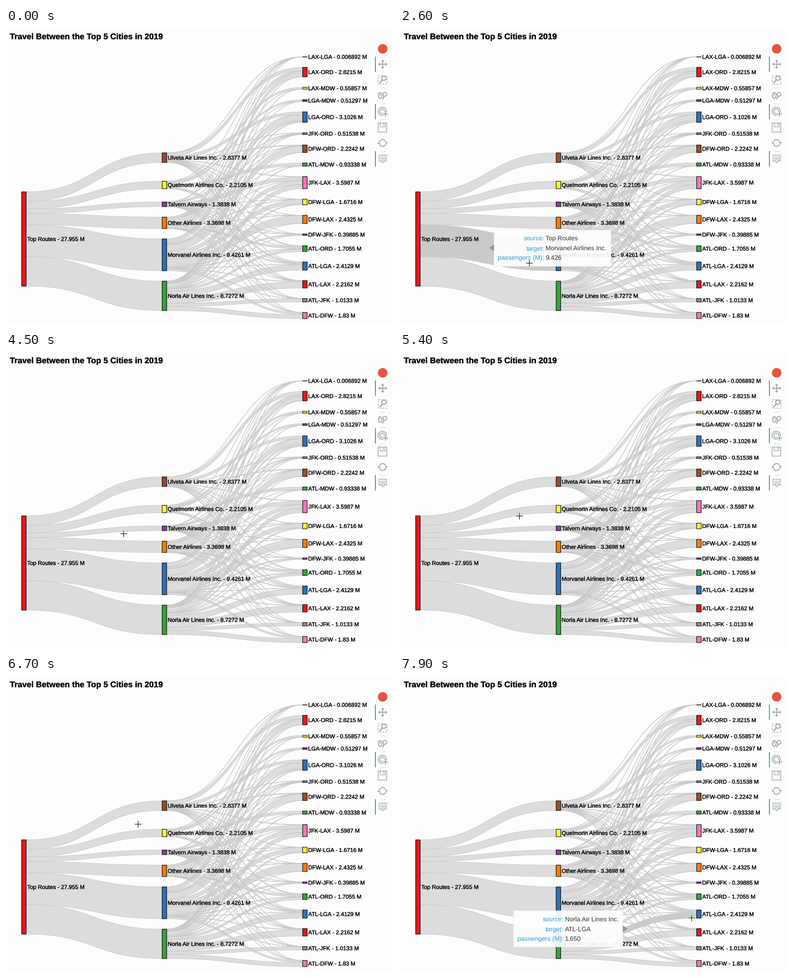
Write a matplotlib script that moves like this. It is 856 px wide and 654 px high and loops after 8 s.

```python
import numpy as np
import matplotlib.pyplot as plt
from matplotlib import patheffects
from matplotlib.animation import FuncAnimation
from matplotlib.collections import PolyCollection
from matplotlib.patches import Arc, Circle, Ellipse, Polygon, Rectangle
from matplotlib.path import Path

W, H = 856, 654
FRAMES, STEP = 80, 100
PT = 0.72                      # points per pixel at 100 dpi
BG, LINK, ICON, BLUE = "#fdfdfd", "#c9c9c9", "#9fa4a7", "#26a0da"

plt.rcParams["font.family"] = "Liberation Sans"
plt.rcParams["text.hinting"] = "none"

RED, BLU, GRN, PUR = "#e3191c", "#2f71b1", "#3aa23c", "#8b3f96"
ORG, YEL, BRN, PNK, GRY = "#fd7c08", "#fdfb35", "#994e24", "#f178b8", "#929292"

# name, passengers, top edge, colour, cities from busiest to quietest
AIRLINES = [
    ("Ulveta Air Lines Inc.", 2.8377, 275.9, BRN, "ORD LAX LGA DFW ATL JFK"),
    ("Quelmorin Airlines Co.", 2.2105, 338.6, YEL, "MDW ATL LGA LAX"),
    ("Talvern Airways", 1.3838, 384.4, PUR, "JFK LAX ORD ATL LGA DFW"),
    ("Other Airlines", 3.3698, 417.9, ORG, "ORD LGA LAX ATL DFW JFK MDW"),
    ("Morvanel Airlines Inc.", 9.4261, 466.0, BLU, "DFW LAX ORD LGA JFK ATL"),
    ("Norla Air Lines Inc.", 8.7272, 559.3, GRN, "ATL LGA LAX JFK DFW ORD MDW"),
]
ROUTES = [
    ("LAX-LGA", 0.006892, ORG), ("LAX-ORD", 2.8215, RED),
    ("LAX-MDW", 0.55857, YEL), ("LGA-MDW", 0.51297, PUR),
    ("LGA-ORD", 3.1026, BLU), ("JFK-ORD", 0.51538, GRY),
    ("DFW-ORD", 2.2242, BRN), ("ATL-MDW", 0.93338, GRN),
    ("JFK-LAX", 3.5987, PNK), ("DFW-LGA", 1.6716, YEL),
    ("DFW-LAX", 2.4325, ORG), ("DFW-JFK", 0.39885, PUR),
    ("ATL-ORD", 1.7055, GRN), ("ATL-LGA", 2.4129, BLU),
    ("ATL-LAX", 2.2162, RED), ("ATL-JFK", 1.0133, GRY),
    ("ATL-DFW", 1.83, PNK),
]
KNOWN_CELL, KNOWN_VALUE = (5, 13), 1.65
SCALE, NODE_W = 7.45, 10
COLUMNS = (34.5, 344.5, 654.5)
ROOT_TOP, ROUTE_TOP, ROUTE_GAP = 362, 63.7, 23.13


def affinity(cities, route):
    """Each step down an airline's city list halves its traffic there."""
    cities = cities.split()
    return np.prod([0.5 ** cities.index(c) if c in cities else 0
                    for c in route.split("-")])


def passenger_matrix():
    """Spread traffic by affinity, then balance it to the node totals."""
    m = np.array([[affinity(a[4], r[0]) for r in ROUTES] for a in AIRLINES])
    rows = np.array([a[1] for a in AIRLINES])
    cols = np.array([r[1] for r in ROUTES])
    for _ in range(300):
        m *= (rows / m.sum(1))[:, None]
        m *= cols / m.sum(0)
        m[KNOWN_CELL] = KNOWN_VALUE
    return m


def ribbon(x0, y0, x1, y1, height):
    t = np.linspace(0, 1, 50)
    x = x0 + (x1 - x0) * (1.5 * t * (1 - t) + t ** 3)
    y = y0 + (y1 - y0) * (3 * t ** 2 - 2 * t ** 3)
    return np.r_[np.c_[x, y], np.c_[x, y + height][::-1]]


def build_links():
    links = []

    def add(column, y0, y1, value, source, target):
        x0, x1 = COLUMNS[column] + NODE_W, COLUMNS[column + 1]
        h = value * SCALE
        links.append(dict(poly=ribbon(x0, y0, x1, y1, h), source=source,
                          target=target, value=value,
                          anchor=((x0 + x1) / 2, (y0 + y1 + h) / 2)))

    leave = ROOT_TOP
    for name, value, top, *_ in AIRLINES:
        add(0, leave, top, value, "Top Routes", name)
        leave += value * SCALE
    arrive = list(route_tops)
    for (name, _, leave, *_), row in zip(AIRLINES, passenger_matrix()):
        for j, value in enumerate(row):
            if value > 0:
                add(1, leave, arrive[j], value, name, ROUTES[j][0])
                leave += value * SCALE
                arrive[j] += value * SCALE
    return links


fig = plt.figure(figsize=(W / 100, H / 100), dpi=100, facecolor=BG)
ax = fig.add_axes([0, 0, 1, 1])
ax.set(xlim=(0, W), ylim=(H, 0))
ax.axis("off")


def label(x, y, text, size, color="black", stroke=0.3, **kw):
    bolder = [patheffects.withStroke(linewidth=stroke * PT, foreground=color)]
    return ax.text(x, y, text, fontsize=size * PT, va="baseline", color=color,
                   path_effects=bolder if stroke else None, **kw)


def line(xs, ys, color=ICON, width=1.6, **kw):
    return ax.plot(xs, ys, color=color, lw=width * PT, **kw)[0]


def outline(patch, width=1.6):
    patch.set(facecolor="none", edgecolor=ICON, linewidth=width * PT)
    ax.add_patch(patch)


def solid(points):
    ax.add_patch(Polygon(points, fc=ICON, ec="none"))


def node(column, top, value, color, name):
    x, h = COLUMNS[column], value * SCALE
    ax.add_patch(Rectangle((x, top), NODE_W, h, fc=color, ec="black",
                           lw=1.2 * PT, snap=False, zorder=4))
    amount = f"{value:.5g}" if value > 0.01 else value
    label(x + NODE_W + 2.2, top + h / 2 + 4.4, f"{name} - {amount} M", 12.53, zorder=5)


def toolbar():
    ax.add_patch(Circle((831, 46), 10.5, fc="#e8533f", ec="none"))
    for y in (63, 167.5, 272):
        line([815, 815], [y, y + 34], BLUE, 2, solid_capstyle="butt")
    for y in (131.5, 166.5, 201.5, 271.5):
        line([825, 837], [y, y], "#d4d6d7", 1)
    # pan
    center = np.array([831, 80])
    for step in np.array([(1, 0), (-1, 0), (0, 1), (0, -1)]):
        tip, base, side = center + 10 * step, center + 6 * step, 4 * step[::-1]
        line(*zip(center, base), width=2)
        solid([tip, base + side, base - side])
    # box zoom
    box = Rectangle((821.5, 104.5), 19, 19)
    outline(box, 1.4)
    box.set_linestyle((0, (2.5, 2)))
    outline(Circle((833.5, 111), 4.8), 2.1)
    line([830, 825], [115, 121], width=2.6)
    # wheel zoom
    outline(Ellipse((825.5, 149), 8, 13), 1.9)
    line([825.5, 825.5], [145, 148.5])
    outline(Circle((836, 146.5), 4.3), 1.9)
    line([834, 831], [151, 157], width=2.3)
    # tap
    for r in (9, 5):
        outline(Arc((830, 184), 2 * r, 2 * r, theta1=75, theta2=375), 1.8)
    line([833, 842], [190, 190], width=2)
    line([837.5, 837.5], [185.5, 194.5], width=2)
    # save
    outline(Rectangle((821.5, 209.5), 19, 20), 1.5)
    line([825.5, 825.5, 836.5, 836.5], [210, 217.5, 217.5, 210], width=1.4)
    line([833.5, 833.5], [211, 215])
    # reset
    for a in (20, 200):
        outline(Arc((831, 254), 15, 15, theta1=a, theta2=a + 135), 2)
    solid([(836, 252), (842, 252), (839.5, 257)])
    solid([(820, 256), (826, 256), (822.5, 251)])
    # hover
    outline(Polygon([(823, 281), (839, 281), (839, 294), (834, 294), (831, 298),
                     (828, 294), (823, 294)]), 1.5)
    for y in (284.5, 287.5, 290.5):
        line([826, 836], [y, y], width=1.2)


heights = np.array([r[1] for r in ROUTES]) * SCALE + ROUTE_GAP
route_tops = ROUTE_TOP + np.cumsum(heights) - heights
links = build_links()
areas = [Path(k["poly"]) for k in links]

ax.add_collection(PolyCollection([k["poly"] for k in links],
                                 facecolors=(0.78, 0.78, 0.78, 0.6),
                                 edgecolors=LINK, linewidths=PT, zorder=2))
node(0, ROOT_TOP, 27.955, RED, "Top Routes")
for name, value, top, color, _ in AIRLINES:
    node(1, top, value, color, name)
for (name, value, color), top in zip(ROUTES, route_tops):
    node(2, top, value, color, name)
label(8.5, 24.8, "Travel Between the Top 5 Cities in 2019", 18.15, weight="bold")
line([0, W], [653.5, 653.5], "#858585", 1)
toolbar()

# Hover parts
glow = Polygon(np.zeros((3, 2)), fc="#cacaca", ec=LINK, lw=PT, zorder=3)
card = Rectangle((0, 0), 1, 80, fc="white", ec="#ececec", lw=PT, alpha=0.92, zorder=7)
arrow = Polygon(np.zeros((3, 2)), fc="#8f9696", ec="none", zorder=7)
for patch in (glow, card, arrow):
    ax.add_patch(patch)
keys = [label(0, 0, s, 14.15, BLUE, stroke=0, ha="right", zorder=8)
        for s in ("source:", "target:", "passengers (M):")]
vals = [label(0, 0, "", 14.15, "#303030", stroke=0, zorder=8) for _ in keys]
hover_parts = [glow, card, arrow, *keys, *vals]
cursor = [line([], [], color, width, zorder=9)
          for color, width in (("white", 3), ("white", 3), ("black", 1.2), ("black", 1.2))]

# time, x, y of the pointer's resting points
STOPS = [(200, 318, 646), (500, 303, 604), (1300, 299, 600), (2600, 285, 519),
         (3600, 255, 440), (5400, 263, 362), (6700, 291, 327), (7900, 643, 534)]


def pointer(t):
    for (t0, *a), (t1, *b) in zip(STOPS, STOPS[1:]):
        if t <= t1:
            u = (t - t0) / (t1 - t0)
            return np.array(a) + np.subtract(b, a) * u * u * (3 - 2 * u)


def show_tooltip(link):
    glow.set_xy(link["poly"])
    for text, s in zip(vals, (link["source"], link["target"], f"{link['value']:.3f}")):
        text.set_text(s)
    renderer = fig.canvas.get_renderer()
    width = 123 + max(v.get_window_extent(renderer).width for v in vals)
    x, y = link["anchor"]
    side = 1 if x < W / 2 else -1
    base = x + 13 * side
    left = base if side > 0 else base - width
    card.set_xy((left, y - 40))
    card.set_width(width)
    arrow.set_xy([(base - 10.5 * side, y), (base, y - 7.5), (base, y + 7.5)])
    for i, (key, val) in enumerate(zip(keys, vals)):
        row = y + 5 + 21.5 * (i - 1)
        key.set_position((left + 111, row))
        val.set_position((left + 114, row))


def update(frame):
    t = frame * STEP
    visible = t >= STOPS[0][0]
    x, y = pointer(max(t, STOPS[0][0]))
    hits = [k for k, area in zip(links, areas) if visible and area.contains_point((x, y))]
    for part in hover_parts:
        part.set_visible(bool(hits))
    if hits:
        show_tooltip(hits[-1])
    for i, stroke in enumerate(cursor):
        stroke.set_visible(visible)
        if i % 2:
            stroke.set_data([x, x], [y - 7, y + 7])
        else:
            stroke.set_data([x - 7, x + 7], [y, y])
    return hover_parts + cursor


anim = FuncAnimation(fig, update, frames=FRAMES, interval=STEP, repeat=True,
                     repeat_delay=0, blit=False)
plt.show()
```
